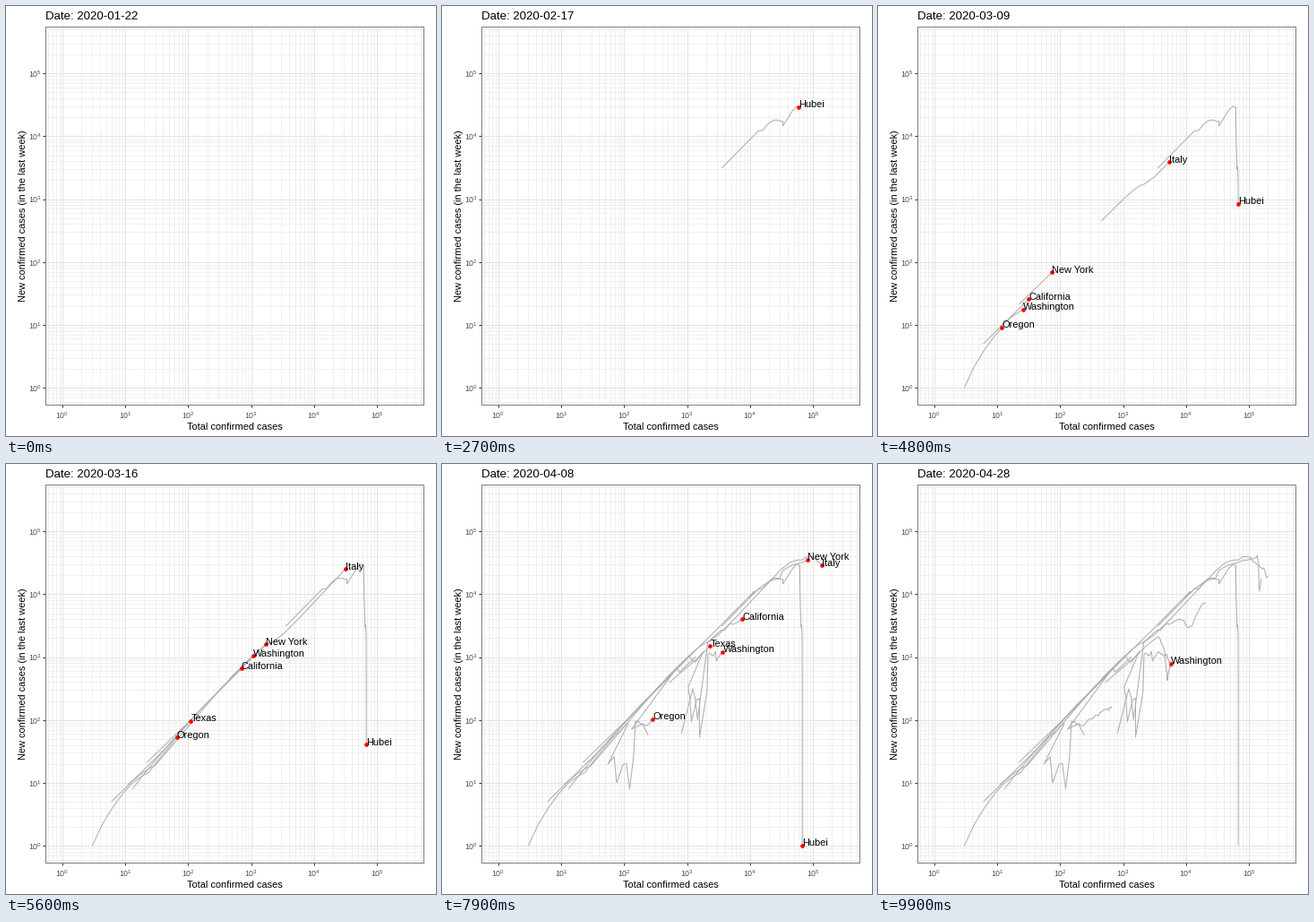
Recreate the animation shown at these times as a matplotlib script. Size 480 px wide and 480 px high, loop 10 s.

```python
import numpy as np
import matplotlib.pyplot as plt
from matplotlib.animation import FuncAnimation

SIZE, FRAMES, LAST, WEEK = 480, 100, 97, 7
LEFT, RIGHT, TOP, BOTTOM = 44, 466, 23, 445     # panel, px
X0, Y0, XDEC, YDEC = 63, 426, 70.2, 70.15       # origin and decade, px
START = np.datetime64("2020-01-22")

# Turning points {day: total cases}; growth in between is exponential.
# Falls on day 60 come from the switch from state to county counts.
KEYS = {
    "California": {33: 1, 40: 6, 48: 40, 49: 177, 55: 698, 56: 751, 59: 1364,
                   60: 407, 63: 812, 64: 1229, 66: 1465, 67: 2136, 70: 3518,
                   77: 7530, 81: 9192, 88: 12341, 92: 17508, 96: 20417},
    "Italy": {28: 2, 35: 453, 37: 888, 48: 6500, 55: 31506, 57: 41035,
              64: 80589, 70: 110574, 77: 139422, 86: 172434, 96: 199414},
    "New York": {36: 1, 43: 22, 48: 100, 49: 220, 55: 1706, 57: 5365,
                 59: 11710, 60: 9654, 64: 21873, 67: 33768, 71: 51809,
                 77: 81803, 84: 118302, 87: 135572, 90: 143000, 93: 143500,
                 96: 156000},
    "Oregon": {34: 2, 41: 3, 44: 9, 48: 13, 54: 43, 55: 66, 57: 88, 58: 114,
               59: 115, 60: 55, 61: 69, 62: 76, 63: 96, 65: 122, 66: 141,
               67: 151, 77: 282, 88: 490, 96: 670},
    "Texas": {41: 5, 48: 13, 55: 110, 57: 304, 59: 581, 60: 131, 63: 240,
              64: 295, 67: 526, 77: 2341, 81: 3628, 89: 4850, 96: 5600},
    "Washington": {34: 1.6, 41: 11, 48: 30, 49: 330, 50: 520, 52: 572,
                   55: 1076, 58: 1524, 59: 1793, 60: 1040, 62: 1170,
                   63: 1420, 64: 1577, 65: 1577, 66: 2077, 67: 2159,
                   69: 2332, 72: 2787, 77: 3698, 84: 4620, 90: 5000,
                   97: 5770},
    "Hubei": {0: 444, 5: 1423, 6: 3554, 7: 3554, 12: 13522, 15: 22112,
              20: 33366, 21: 33366, 22: 48206, 24: 56249, 27: 61682,
              30: 62662, 33: 64287, 79: 67803},
}
rng = np.random.default_rng(4)


def cumulative(name):
    keys = KEYS[name]
    days = np.arange(min(keys), max(keys) + 1)
    total = 10 ** np.interp(days, list(keys), np.log10(list(keys.values())))
    if name == "Hubei":                 # dies out to one case a week
        t = days - 33
        tail = 67800 + (days - 60) / WEEK - 3500 * np.exp(-0.1025 * t - 0.013 * t**2)
        total = np.where(t > 0, tail, total)
    elif name != "Italy":               # uneven county reports
        noise = 1 + 0.005 * rng.standard_normal(len(days))
        total = np.where(days > 66, total * noise, total)
    return days, total


def weekly_runs(days, total):
    """Frames and log values, split wherever the weekly change is negative."""
    new = total[WEEK:] - total[:-WEEK]
    ok = np.flatnonzero(new > 0)
    runs = np.split(ok, np.flatnonzero(np.diff(ok) > 1) + 1)
    return [(np.round(days[r + WEEK] * (FRAMES - 1) / LAST),
             np.log10(total[r + WEEK]), np.log10(new[r])) for r in runs]


tracks = {name: weekly_runs(*cumulative(name)) for name in KEYS}

plt.rcParams["font.family"] = "Liberation Sans"
fig = plt.figure(figsize=(SIZE / 72, SIZE / 72), dpi=72, facecolor="white")
ax = fig.add_axes([LEFT / SIZE, 1 - BOTTOM / SIZE,
                   (RIGHT - LEFT) / SIZE, (BOTTOM - TOP) / SIZE])
ax.set_xlim((LEFT - X0) / XDEC, (RIGHT - X0) / XDEC)
ax.set_ylim((Y0 - BOTTOM) / YDEC, (Y0 - TOP) / YDEC)

minor = [e + np.log10(m) for e in range(-1, 6) for m in range(2, 10)]
powers = [rf"$\mathregular{{10^{{{e}}}}}$" for e in range(6)]
for axis, (lo, hi) in ((ax.xaxis, ax.get_xlim()), (ax.yaxis, ax.get_ylim())):
    axis.set_ticks(range(6), powers)
    axis.set_ticks([v for v in minor if lo < v < hi], minor=True)
ax.set_axisbelow(True)
ax.grid(which="major", color="#e4e4e4", lw=1.07)
ax.grid(which="minor", color="#ebebeb", lw=0.7)
ax.tick_params(which="major", length=2.75, width=1, color="#333333",
               labelsize=8.8, labelcolor="#4d4d4d")
ax.tick_params(axis="x", pad=3.5)
ax.tick_params(axis="y", pad=1.5)
ax.tick_params(which="minor", length=0)
for spine in ax.spines.values():
    spine.set(color="#7f7f7f", lw=1)


def label(x, y, s, size, **kw):
    return fig.text(x / SIZE, 1 - y / SIZE, s, fontsize=size, **kw)


title = label(44, 15, "", 13.2, va="baseline")
label(255, 473, "Total confirmed cases", 11, ha="center", va="baseline")
label(24, 234.5, "New confirmed cases (in the last week)", 11, rotation=90,
      ha="right", va="center")

lines, dots, names = {}, {}, {}
for name in sorted(tracks):
    lines[name], = ax.plot([], [], color="#b0b0b0", lw=1.07, zorder=3,
                           solid_capstyle="butt")
    dots[name], = ax.plot([], [], "o", color="red", ms=4.7, mew=0, zorder=4)
    names[name] = ax.text(0, 0, name, fontsize=11, va="baseline", zorder=5,
                          clip_on=True)


def update(i):
    title.set_text(f"Date: {START + LAST * i // (FRAMES - 1)}")
    for name, runs in tracks.items():
        xs, ys, head = [], [], None
        for k, x, y in runs:
            if i < k[0]:
                continue
            tip = np.interp(i, k, x), np.interp(i, k, y)
            past = k < i
            xs += [*x[past], tip[0], np.nan]
            ys += [*y[past], tip[1], np.nan]
            if i <= k[-1]:
                head = tip
        lines[name].set_data(xs, ys)
        dots[name].set_visible(head is not None)
        names[name].set_visible(head is not None)
        if head is not None:
            dots[name].set_data([head[0]], [head[1]])
            names[name].set_position((head[0], head[1] - 0.5 / YDEC))
    return []


anim = FuncAnimation(fig, update, frames=FRAMES, interval=100, repeat=True,
                     repeat_delay=0)
plt.show()
```
